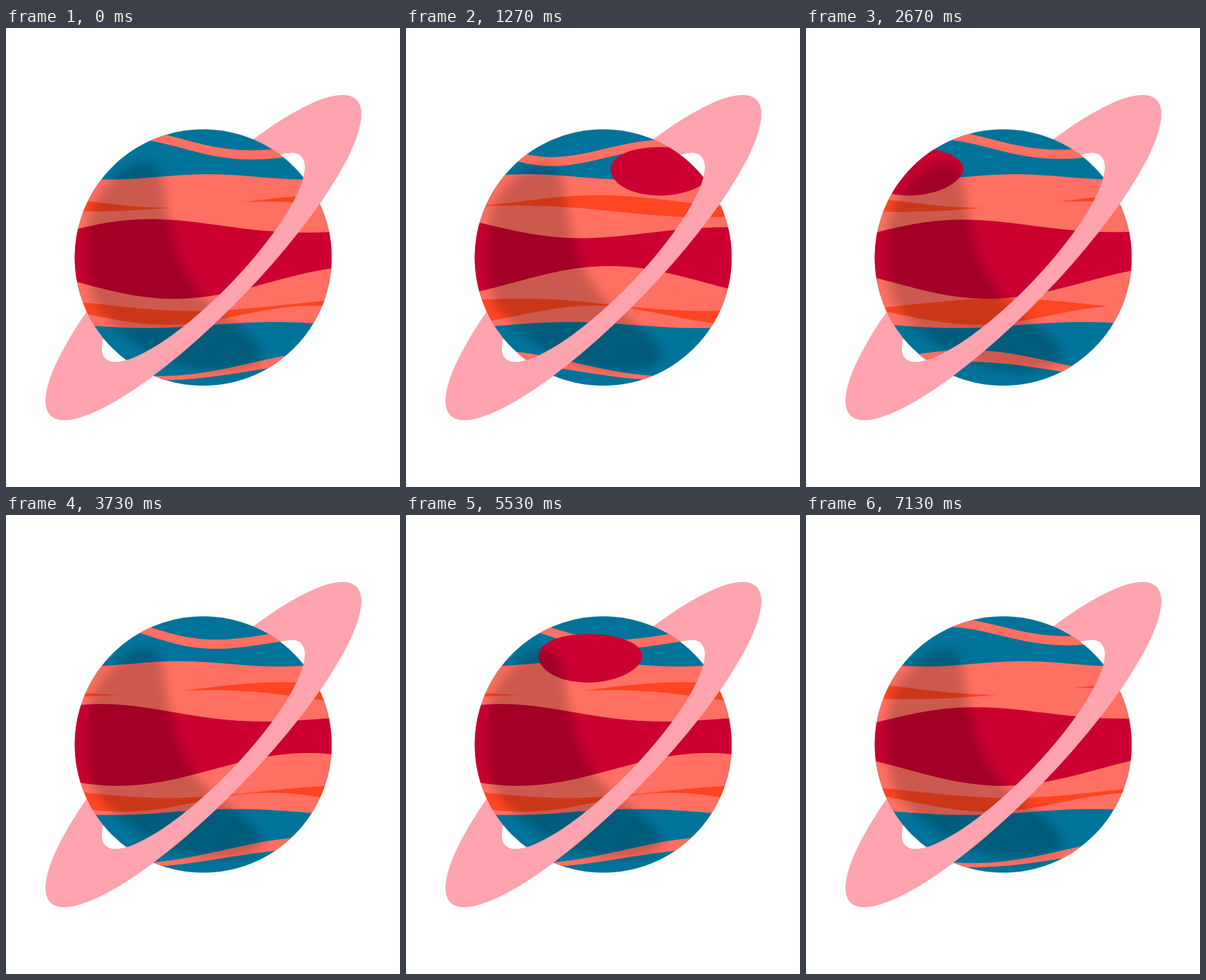
Recreate the animation shown at these times as an HTML page. Size 600 by 700 pixels, loop 7190 ms.

```html
<!DOCTYPE html>
<html lang="en">
<head>
<meta charset="utf-8">
<title>Ringed planet</title>
<style>
  html, body { margin: 0; width: 100%; height: 100%; overflow: hidden; background: #fff; }
  svg { display: block; width: 600px; height: 700px; }
  .coral { fill: #ff7062; }
  .orange { fill: #ff4521; }
  .red { fill: #cb0031; }
  .ring { fill: #ffa3af; }
</style>
</head>
<body>
<svg viewBox="0 0 600 700">
  <defs>
    <clipPath id="disc"><circle cx="300.3" cy="350" r="195.6"/></clipPath>
    <filter id="soft" x="-20%" y="-20%" width="140%" height="140%"><feGaussianBlur stdDeviation="8"/></filter>
  </defs>
  <g class="ring" transform="translate(300.5 350) rotate(-46)">
    <path fill-rule="evenodd" d="M-335 0A335 84 0 0 0 335 0A335 84 0 0 0 -335 0ZM-214.5 0A214.5 57.5 0 0 0 214.5 0A214.5 57.5 0 0 0 -214.5 0Z"/>
  </g>
  <g clip-path="url(#disc)">
    <rect x="100" y="150" width="400" height="400" fill="#00739a"/>
    <path id="topLine" class="coral"/>
    <path id="body" class="coral"/>
    <path id="upperStreak" class="orange"/>
    <path id="lowerStreak" class="orange"/>
    <path id="belt" class="red"/>
    <path id="bottomLine" class="coral"/>
    <path id="spot" class="red" d="M0 215C0 193 35 181.5 78 181.5S158 196 158 215S120 255.5 76 255.5S0 238 0 215Z"/>
    <path filter="url(#soft)" opacity=".2" d="M215 205C241 209 239 248 247 286C257 342 273 384 308 419C344 452 390 472 390 502C385 518 350 526 300 522C220 510 165 460 138 425C116 380 116 300 138 262C160 227 190 203 215 205Z"/>
  </g>
  <g class="ring" transform="translate(300.5 350) rotate(-46)">
    <path d="M-335 0A335 84 0 0 0 335 0H214.5A214.5 57.5 0 0 1 -214.5 0Z"/>
  </g>
</svg>
<script>
const LOOP = 7190, FRAMES = 108, STEP = 1000 / 15;
const SLOW = 1800, FAST = 900, SPOT_TURN = 3600, SPOT_SPAN = 592;

// Wave moving left: dip is the x of its lowest point at t = 0,
// grow is the change in height per 200 px to the right of the centre
const wave = (level, height, dip, length, period, grow = 0) => (x, t) =>
  level + height * (1 + grow * (x - 300) / 200) *
  Math.cos(2 * Math.PI * ((x - dip) / length + t / period));

// Band around a middle line; half gives its half thickness at height y
const ribbon = (mid, half) => [-1, 1].map(side => (x, t) => {
  const y = mid(x, t);
  return y + side * half(y);
});

// Top and bottom edge of each band
const bands = {
  topLine: ribbon(wave(184, 15, 398, 400, FAST, -0.87), () => 7),
  body: [wave(227, 4, 158, 300, FAST), wave(453, 4.6, 215, 385, FAST)],
  upperStreak: [wave(264.5, 9.5, 249, 480, FAST), wave(276, 9, 75, 600, FAST, 0.58)],
  lowerStreak: [wave(422, 9.5, 288, 555, SLOW), wave(438, 14.5, 244, 450, FAST)],
  belt: [wave(307, 12.5, 504, 530, FAST, -0.68), wave(388, 25, 256, 580, FAST)],
  bottomLine: ribbon(wave(517, 17, 234, 555, SLOW), y => 3.2 + (534 - y) * 0.17)
};

function bandPath([top, bottom], t) {
  const upper = [], lower = [];
  for (let x = 100; x <= 500; x += 4) {
    const y = top(x, t);
    upper.push(x + ' ' + y.toFixed(2));
    lower.unshift(x + ' ' + Math.max(y, bottom(x, t)).toFixed(2));
  }
  return 'M' + upper.concat(lower).join('L') + 'Z';
}

// Enters on the right at 520 and wraps once it is out of sight on the left
function spotLeft(t) {
  const travelled = (t / SPOT_TURN % 1) * SPOT_SPAN;
  return 520 - travelled;
}

const byId = id => document.getElementById(id);
const start = performance.now();

function draw(now) {
  const elapsed = Math.max(0, now - start) % LOOP;
  const t = Math.floor(elapsed / LOOP * FRAMES) * STEP;
  for (const id in bands) byId(id).setAttribute('d', bandPath(bands[id], t));
  byId('spot').setAttribute('transform', `translate(${spotLeft(t).toFixed(2)} 0)`);
  requestAnimationFrame(draw);
}
draw(start);
</script>
</body>
</html>
```
